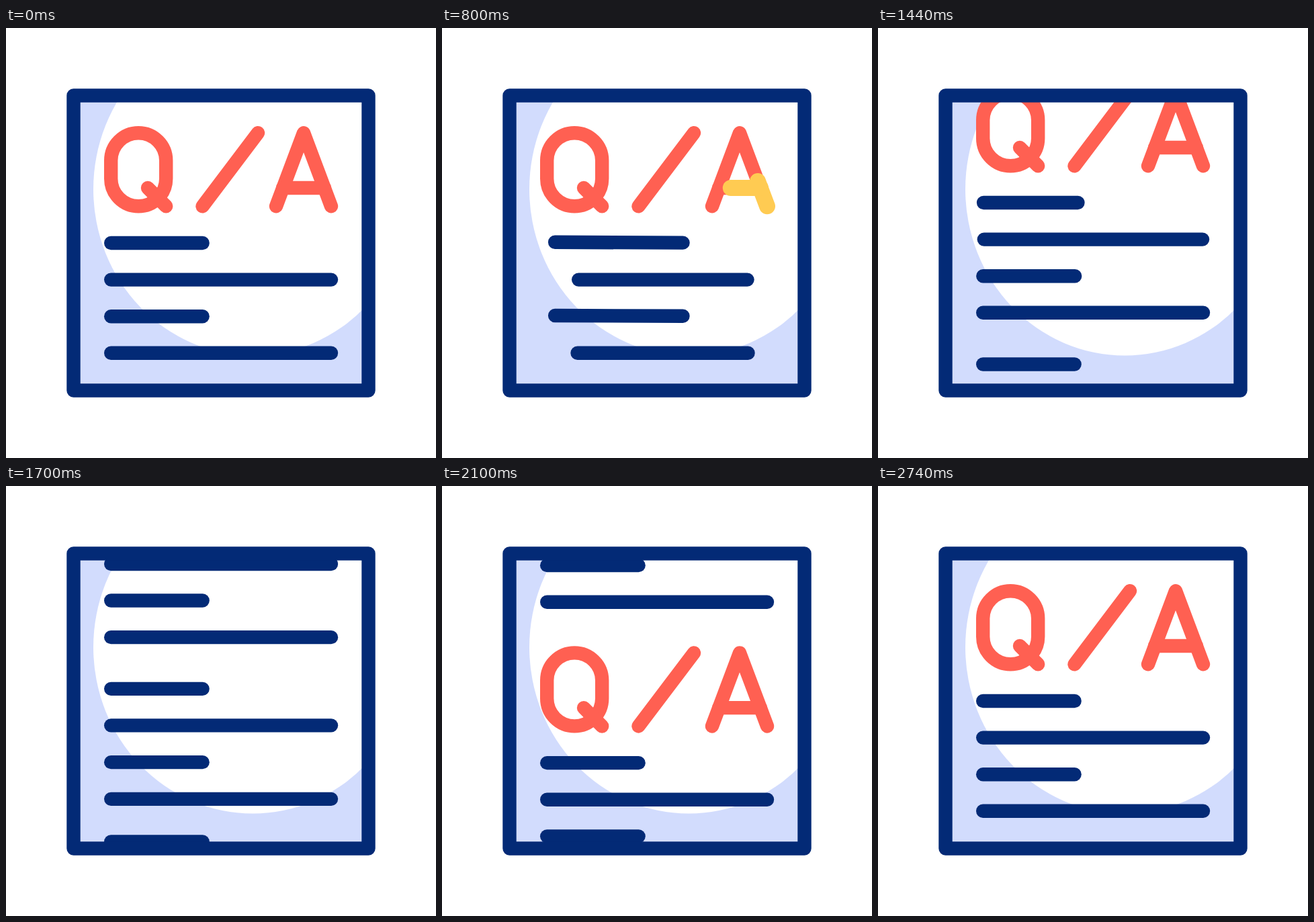
These frames come from a looping animation (640 px wide and 640 px high, 3000 ms). An HTML page:

```html
<!DOCTYPE html>
<html lang="en">
<head>
<meta charset="utf-8">
<title>Q/A sheet</title>
<style>
  html, body { margin: 0; width: 100%; height: 100%; overflow: hidden; background: #fff; }
  svg { display: block; width: 100vw; height: 100vh; }
  path, .frame { fill: none; stroke-width: 20.4; stroke-linecap: round; stroke-linejoin: round; }
  .line, .frame { stroke: #032a76; }
  .letter { stroke: #ff6052; }
  .glow { stroke: #ffcb52; stroke-width: 24; }
</style>
</head>
<body>
<svg viewBox="0 0 640 640">
  <clipPath id="inside"><rect x="101" y="101" width="438" height="438"/></clipPath>
  <rect x="101" y="101" width="438" height="438" fill="#d2dcfd"/>
  <g clip-path="url(#inside)">
    <ellipse cx="367.2" cy="240" rx="237.2" ry="247.5" fill="#fff"/>
    <g id="scroll">
      <g id="sheet"></g>
      <use href="#sheet" y="762"/>
    </g>
  </g>
  <rect class="frame" x="100.5" y="100.5" width="439" height="439"/>
</svg>
<script>
const LOOP = 3000;
const scroll = document.getElementById('scroll');
const sheet = document.getElementById('sheet');

function addPath(parent, cls, d) {
  const p = document.createElementNS('http://www.w3.org/2000/svg', 'path');
  p.setAttribute('class', cls);
  p.setAttribute('d', d);
  parent.appendChild(p);
  return p;
}

// Timing curve with flat ends: cubic-bezier(x1, 0, x2, 1)
function ease(t, x1, x2) {
  if (t <= 0) return 0;
  if (t >= 1) return 1;
  let lo = 0, hi = 1;
  for (let i = 0; i < 30; i++) {
    const u = (lo + hi) / 2, v = 1 - u;
    if (3 * u * v * v * x1 + 3 * u * u * v * x2 + u * u * u < t) lo = u; else hi = u;
  }
  return lo * lo * (3 - 2 * lo);
}
const smooth = t => ease(t, 1 / 3, 2 / 3);

// Letters, in the order the highlight runs through them
const strokes = [
  'M156.2 197.2a41 41 0 0 1 82 0v27a41 41 0 0 1-82 0z',
  'M211 238L238.2 265.3',
  'M292.5 265.3L375 156.2',
  'M402 265.3L443 156.2L484 265.3',
  'M474 238H412'
];
strokes.forEach(d => addPath(sheet, 'letter', d));
let total = 0;
const glows = strokes.map(d => {
  const el = addPath(sheet, 'glow', d);
  const len = el.getTotalLength();
  const part = { el, len, from: total };
  total += len;
  return part;
});

// Text lines
const shape = (x1, y1, x2, y2) => `M${x1} ${y1}L${x2} ${y2}`;
const LEFT = 156.2, SHORT = 292.6, LONG = 484;
const rowY = i => 320 + 54.6 * i;
const rows = [0, 1, 2, 3].map(i => addPath(sheet, 'line', ''));
[560.5, 615, 669.8, 724.5, 788, 842.6].forEach((y, i) =>
  addPath(scroll, 'line', shape(LEFT, y, i % 2 ? LONG : SHORT, y)));

function drawRows(ms) {
  rows.forEach((row, i) => {
    const t = (ms - (3 - i) * 40) / 720;
    const e = t < 1 ? smooth(t) : smooth(2 - t);
    const y = rowY(i);
    row.setAttribute('d', i % 2
      ? shape(LEFT + 47 * e, y, LONG - 29.5 * e, y)
      : shape(LEFT + 12 * e, y - 1.2 * e, SHORT + 66.5 * e, y - 0.4 * e));
  });
}

function drawGlow(ms) {
  const head = total * smooth(ms / 880);
  const tail = total * smooth((ms - 120) / 880);
  for (const { el, len, from } of glows) {
    const a = Math.max(0, tail - from);
    const b = Math.min(len, head - from);
    el.style.display = b - a > 0.01 ? '' : 'none';
    el.style.strokeDasharray = `${Math.max(0, b - a)} ${len * 2}`;
    el.style.strokeDashoffset = -a;
  }
}

function draw(ms) {
  drawRows(ms);
  drawGlow(ms);
  const y = -762 * ease((ms - 1000) / 1740, 0.66, 0.2);
  scroll.setAttribute('transform', `translate(0 ${y})`);
}

const start = performance.now();
function tick() {
  draw((performance.now() - start) % LOOP);
  requestAnimationFrame(tick);
}
tick();
</script>
</body>
</html>
```
